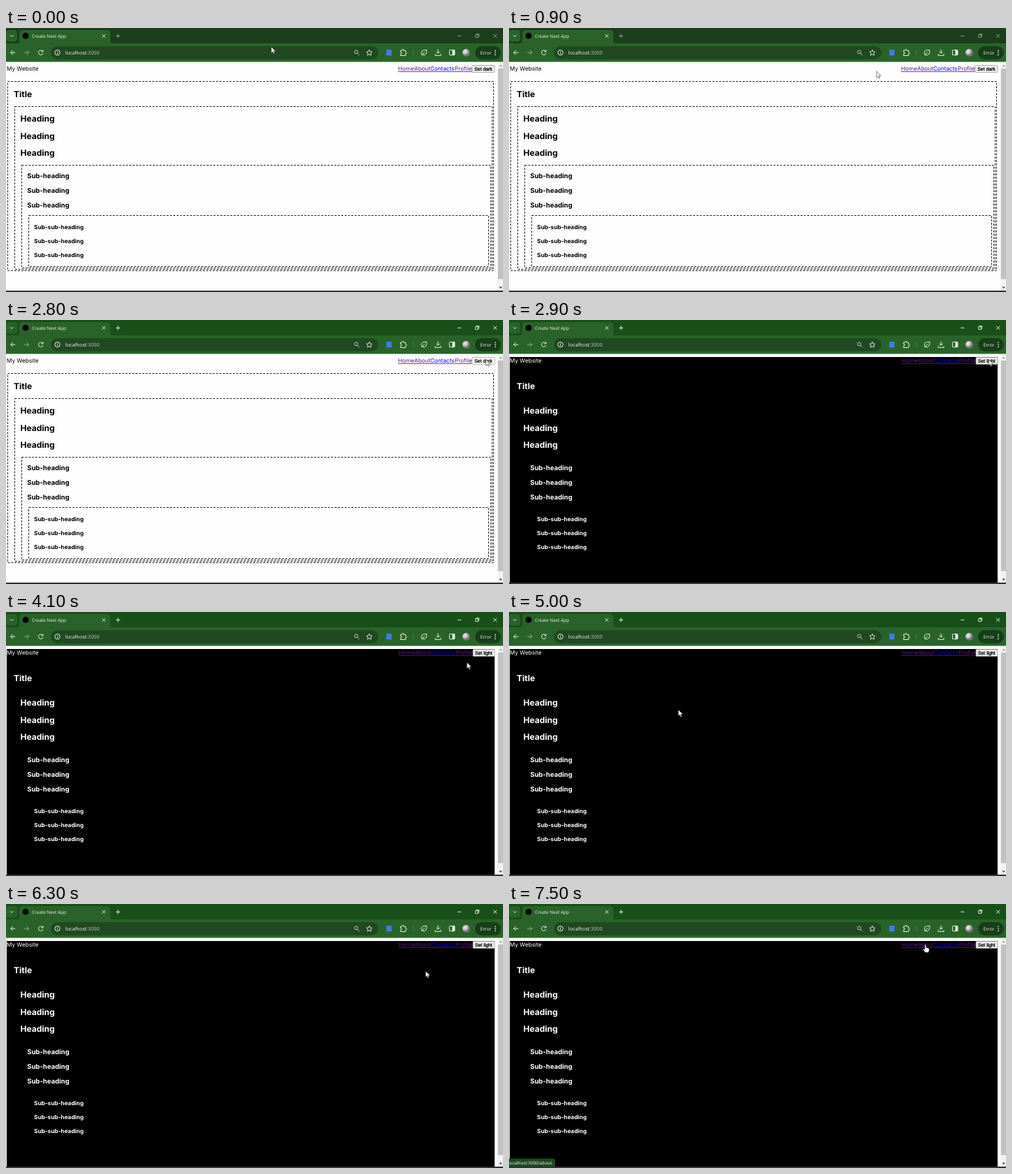
Write an HTML page that moves like this. It is 710 by 378 pixels and loops after 8 s.

```html
<!DOCTYPE html>
<html lang="en">
<head>
<meta charset="utf-8">
<title>Theme toggle</title>
<style>
html, body { margin: 0; width: 100%; height: 100%; overflow: hidden; background: #fff; }
svg { display: block; width: 710px; height: 378px; }
text { text-rendering: geometricPrecision; white-space: pre; }

.ui { font-family: "Noto Sans", "Open Sans", sans-serif; fill: #e2efe0; }
.page { font-family: Inter, sans-serif; font-size: 8.2px; }
.h2, .h3, .h4 { font-weight: 700; }
.h2 { font-size: 12px; }
.h3 { font-size: 9.5px; }
.h4 { font-size: 8.22px; }
.button text { font: 6.83px "Liberation Sans", Arial, sans-serif; fill: #000; stroke: #000; stroke-width: .28px; }
.button rect { fill: #efefef; stroke: #8f8f8f; stroke-width: .7px; }
.icon { fill: none; stroke: #e2efe0; stroke-width: 1px; }
.boxes { fill: none; stroke: #222; stroke-dasharray: 3 1.8; }
.links { text-decoration: underline; fill: #551a8b; }
.links .new { fill: #0000ee; }

.page, .links, .dark, .light, .press, .status, .hand, .arrow, .cursor, .controls, .strip {
  animation: 8s step-end infinite;
}
.page { animation-name: ink; }
.links { animation-name: nudge; }
.dark { animation-name: dark; }
.light { animation-name: light; }
.press { animation-name: press; }
.controls { animation-name: focus; }
.strip { animation-name: tint; }
.status, .hand { animation-name: hover; }
.arrow { animation-name: unhover; }
.cursor { animation-name: move; }

@keyframes ink { 0% { fill: #000 } 36.25%, 100% { fill: #fff } }
@keyframes nudge { 0% { transform: none } 36.25%, 100% { transform: translateX(1px) } }
@keyframes dark { 0% { opacity: 0 } 36.25%, 100% { opacity: 1 } }
@keyframes light { 0% { opacity: 1 } 36.25%, 100% { opacity: 0 } }
@keyframes press { 0% { opacity: 0 } 35% { opacity: 1 } 36.25%, 100% { opacity: 0 } }
@keyframes focus { 0% { opacity: .58 } 35%, 100% { opacity: 1 } }
@keyframes tint { 0% { fill: #1c3e1c } 35%, 100% { fill: #19501a } }
@keyframes hover { 0% { opacity: 0 } 93.75%, 100% { opacity: 1 } }
@keyframes unhover { 0% { opacity: 1 } 93.75%, 100% { opacity: 0 } }

/* The pointer advances once every 100 ms. */
@keyframes move {
  0% { transform: translate(379px, 27px); animation-timing-function: steps(9) }
  11.25% { transform: translate(525px, 62px); animation-timing-function: steps(9) }
  22.5% { transform: translate(643px, 80px); animation-timing-function: steps(6) }
  30%, 48.75% { transform: translate(685.5px, 56.5px); animation-timing-function: steps(3) }
  52.5% { transform: translate(645px, 80px); animation-timing-function: steps(2) }
  55% { transform: translate(525px, 95px); animation-timing-function: steps(2) }
  57.5% { transform: translate(380px, 99px); animation-timing-function: steps(2) }
  60% { transform: translate(235px, 115px); animation-timing-function: steps(2) }
  62.5% { transform: translate(242px, 140px); animation-timing-function: steps(7) }
  71.25% { transform: translate(635px, 133px); animation-timing-function: steps(6) }
  78.75% { transform: translate(599.5px, 96px); animation-timing-function: steps(10) }
  91.25% { transform: translate(594.5px, 64px) }
  93.75%, 100% { transform: translate(594px, 58px) }
}
</style>
</head>
<body>
<svg viewBox="0 0 710 378">
  <defs>
    <radialGradient id="photo" cx=".35" cy=".35">
      <stop offset="0" stop-color="#f0eeee"/>
      <stop offset=".6" stop-color="#c4bec2"/>
      <stop offset="1" stop-color="#77727a"/>
    </radialGradient>
  </defs>

  <!-- Page -->
  <rect y="48" width="710" height="330" fill="#fefefe"/>
  <rect class="dark" x="1" y="53" width="697" height="323"/>
  <g class="light boxes">
    <rect x="2.5" y="76.5" width="694" height="271"/>
    <rect x="12.5" y="112.5" width="682" height="233"/>
    <rect x="22.5" y="196.5" width="670" height="147"/>
    <rect x="32.5" y="268.5" width="657" height="73"/>
  </g>
  <g class="page">
    <text x="1" y="61">My Website</text>
    <text class="h2" x="11" y="99">Title</text>
    <g class="h2">
      <text x="20.5" y="134.2">Heading</text>
      <text x="20.5" y="158.6">Heading</text>
      <text x="20.5" y="183.1">Heading</text>
    </g>
    <g class="h3">
      <text x="30.2" y="215.3">Sub-heading</text>
      <text x="30.2" y="236">Sub-heading</text>
      <text x="30.2" y="256.6">Sub-heading</text>
    </g>
    <g class="h4">
      <text x="40" y="287.5">Sub-sub-heading</text>
      <text x="40" y="307.8">Sub-sub-heading</text>
      <text x="40" y="328">Sub-sub-heading</text>
    </g>
    <g class="links">
      <text x="560" y="61">Home</text>
      <text x="583" y="61">About</text>
      <text class="new" x="606" y="61">Contacts</text>
      <text x="641" y="61">Profile</text>
    </g>
  </g>
  <g class="button light">
    <rect x="666" y="53.5" width="32" height="10" rx="1"/>
    <rect class="press" x="666" y="53.5" width="32" height="10" rx="1" style="fill:#f8f8f8;stroke:#b5b5b5"/>
    <text x="669.3" y="60.9">Set dark</text>
  </g>
  <g class="button dark">
    <rect x="667" y="53.5" width="31" height="10" rx="1"/>
    <text x="670" y="60.9">Set light</text>
  </g>

  <!-- Scrollbar -->
  <rect x="702" y="49" width="8" height="327" fill="#f3f3f3"/>
  <rect x="702.8" y="58" width="7.2" height="301.5" fill="#c1c1c1"/>
  <path d="M704.5 55.2h4.4l-2.2-2.7z" fill="#999"/>
  <path d="M704.5 370.6h4.4l-2.2 2.7z" fill="#444"/>
  <rect y="376" width="710" height="2" fill="#303236"/>

  <!-- Tab strip -->
  <rect class="strip" width="710" height="24"/>
  <rect y="22" width="710" height="26.5" fill="#2a632a"/>
  <path d="M15 22.5q4 0 4-4V8q0-5 5-5h120q5 0 5 5v10.5q0 4 4 4z" fill="#2a632a"/>
  <rect y="3" width="16" height="16.5" rx="4.5" fill="#2a632a"/>
  <path class="icon" d="M6 10.3l2.2 2.2 2.2-2.2"/>
  <circle cx="28" cy="11.2" r="4.4"/>
  <text class="ui" x="37" y="13.6" font-size="6.4">Create Next App</text>
  <path class="icon" d="M137.5 9.2l4.4 4.4m0-4.4l-4.4 4.4"/>
  <g class="icon controls">
    <path d="M157 11.3h6m-3-3v6"/>
    <path d="M645.3 11.3h5"/>
    <path d="M670.7 9.7h3.7v3.8h-3.7zM672 9.5v-1h3.7v3.7h-1" stroke-width=".9"/>
    <path d="M696.2 8.8l5 5m0-5l-5 5"/>
  </g>

  <!-- Toolbar -->
  <rect x="64" y="26" width="468" height="19" rx="9.5" fill="#204921"/>
  <text class="ui" x="84.8" y="37.7" font-size="7.2">localhost<tspan fill="#a9c3a7">:3000</tspan></text>
  <g class="icon">
    <path d="M13.3 35.2H6.8m3-3.2l-3.2 3.2 3.2 3.2"/>
    <path d="M26 35.2h6.5m-3-3.2l3.2 3.2-3.2 3.2" opacity=".5"/>
    <path d="M52.3 33.2a3.3 3.3 0 1 0 .6 2.8M53 31.5v2.4h-2.5"/>
    <circle cx="73.5" cy="35.2" r="3.7"/>
    <path d="M73.5 34.7v2.5m0-4.2v1"/>
    <g opacity=".8">
      <circle cx="500.2" cy="34.3" r="2.4"/>
      <path d="M502 36.2l2.8 2.8"/>
    </g>
    <path d="M519 31.2l1.2 2.7 2.9.3-2.2 2 .7 2.9-2.6-1.5-2.6 1.5.7-2.9-2.2-2 2.9-.3z" stroke-width=".9"/>
    <path d="M563.7 32.2h2.2q0-1.7 1.2-1.7t1.2 1.7h2.5v2.4q1.5 0 1.5 1.2t-1.5 1.2v2.5h-7.1v-2.4q1.6 0 1.6-1.3t-1.6-1.3z"/>
    <path d="M582 31v8.5" stroke="#4f814c" stroke-width=".8"/>
    <path d="M600.8 31.4q-7.5-.3-7.5 4.2 0 3.3 3.4 3.3 4.7 0 4.1-7.5zM594 39.3q1.5-3.5 4.3-4.8"/>
    <path d="M617.2 30.5v5.8m-2.6-2.6l2.6 2.6 2.6-2.6M613.2 37v2.4h8V37"/>
    <rect x="633.5" y="31.5" width="7.5" height="7.3" rx=".8"/>
  </g>
  <path d="M637.5 31.5h3.5v7.3h-3.5z" fill="#e2efe0"/>
  <rect x="543.3" y="31" width="7.5" height="8.5" rx="1" fill="#3f7ee0"/>
  <circle cx="657.5" cy="35.3" r="5.5" fill="url(#photo)"/>
  <rect x="670" y="26" width="37" height="19" rx="9.5" fill="#173e19"/>
  <text class="ui" x="677.8" y="37.6" font-size="6.5">Error</text>
  <g fill="#e2efe0">
    <circle cx="699" cy="32.3" r=".9"/>
    <circle cx="699" cy="35.3" r=".9"/>
    <circle cx="699" cy="38.3" r=".9"/>
  </g>

  <!-- Link address -->
  <g class="status">
    <path d="M0 364.5h62.5q3.5 0 3.5 3.5v8.3H0z" fill="#204921"/>
    <text class="ui" x="-1" y="372.8" font-size="6.3">localhost:3000/about</text>
  </g>

  <!-- Pointer -->
  <g class="cursor" fill="#fff" stroke="#333" stroke-width=".6" stroke-linejoin="round">
    <path class="arrow" d="M0 0v8.7l2-1.8 1.3 3.2 1.5-.6-1.3-3.1h2.7z"/>
    <path class="hand" d="M0 1q0-1 .9-1t.9 1v3.4q1.7-.3 1.8.6 1.4-.2 1.5.7 1.3 0 1.2 1.2 0 2.3-1.1 4.4H.5Q-.8 9-2.3 7.5q-.6-1 .3-1.3Q-.9 6 0 7.3z"/>
  </g>
</svg>
</body>
</html>
```
